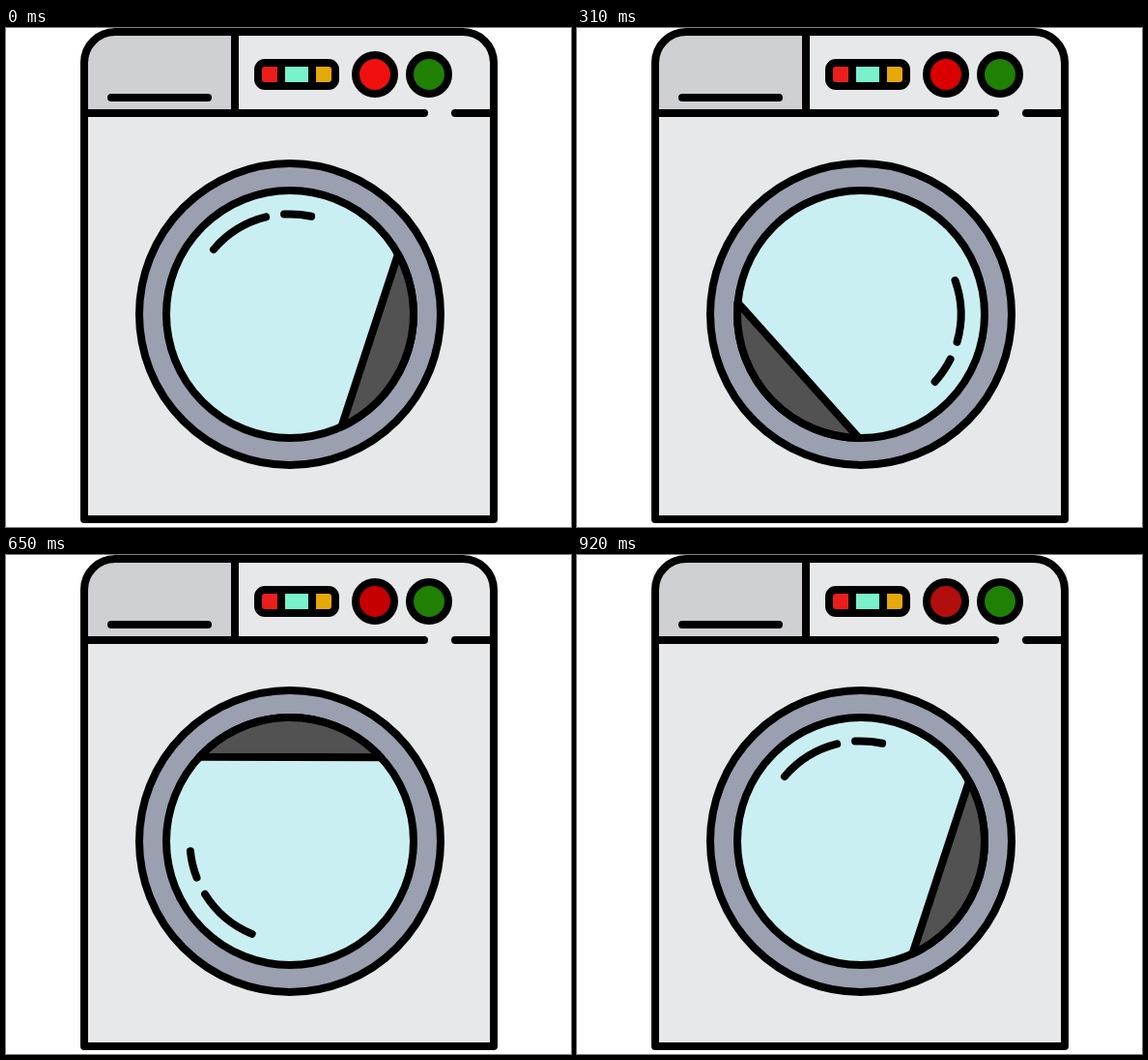
An HTML page with a canvas that plays this animation: 585x516 px, repeating every 950 ms.

```html
<!DOCTYPE html>
<html lang="en">
<head>
<meta charset="utf-8">
<title>Washing machine</title>
<style>
  html, body { margin: 0; width: 100%; height: 100%; overflow: hidden; background: #fff; }
  canvas { display: block; }
</style>
</head>
<body>
<canvas id="stage" width="585" height="516"></canvas>
<script>
const ctx = document.getElementById('stage').getContext('2d');
const TAU = Math.PI * 2;
const rad = deg => deg * Math.PI / 180;

const STEPS = 31;
const DRUM = { x: 294, y: 296, rim: 156, glass: 128 };
const LEVEL = 87;

// Two poses are held slightly longer than the others.
const holds = Array(STEPS).fill(30);
holds[9] = holds[13] = 40;
const LOOP = holds.reduce((sum, ms) => sum + ms, 0);

function stepAt(ms) {
  let rest = ms % LOOP;
  let step = 0;
  while (step < STEPS - 1 && rest >= holds[step]) rest -= holds[step++];
  return step;
}

function line(x1, y1, x2, y2) {
  ctx.beginPath();
  ctx.moveTo(x1, y1);
  ctx.lineTo(x2, y2);
  ctx.stroke();
}

function disc(x, y, r, fill) {
  ctx.beginPath();
  ctx.arc(x, y, r, 0, TAU);
  if (fill) {
    ctx.fillStyle = fill;
    ctx.fill();
  }
  ctx.stroke();
}

function box(x, y, w, h, fill) {
  ctx.fillStyle = fill;
  ctx.fillRect(x, y, w, h);
}

function drawCabinet() {
  const shell = new Path2D();
  shell.roundRect(81, 4, 424, 504, [32, 32, 0, 0]);

  ctx.save();
  ctx.clip(shell);
  box(81, 4, 424, 504, '#e6e8ea');
  box(81, 4, 156, 84, '#cfd0d4');
  ctx.restore();

  ctx.stroke(shell);
  line(237, 4, 237, 88);
  line(81, 88, 433, 88);
  line(465, 88, 505, 88);
  line(109, 72, 209, 72);
}

function drawDisplay() {
  box(261, 36, 24, 24, '#eb1f1a');
  box(285, 36, 32, 24, '#79f1cb');
  box(317, 36, 24, 24, '#e5a90a');
  line(285, 36, 285, 60);
  line(317, 36, 317, 60);
  ctx.beginPath();
  ctx.roundRect(261, 36, 80, 24, 7);
  ctx.stroke();
}

function drawKnobs(step) {
  const red = Math.round(240 - 62 * step / (STEPS - 1));
  const tint = Math.round(Math.max(0, 16 - 2.5 * step, 1.5 * (step - 21)));
  disc(382, 48, 20, `rgb(${red},${tint},${tint})`);
  disc(438, 48, 20, '#1f8003');
}

function drawDrum(step) {
  ctx.save();
  ctx.translate(DRUM.x, DRUM.y);
  disc(0, 0, DRUM.rim, '#9aa0b0');
  disc(0, 0, DRUM.glass, '#caeff2');

  ctx.rotate(rad(step * 360 / (STEPS - 1)));

  // The dark segment beyond the chord
  const half = Math.acos(LEVEL / DRUM.glass);
  const tilt = rad(18.15);
  ctx.beginPath();
  ctx.arc(0, 0, DRUM.glass, tilt - half, tilt + half);
  ctx.closePath();
  ctx.fillStyle = '#525252';
  ctx.fill();
  ctx.save();
  ctx.lineCap = 'butt';
  ctx.stroke();
  ctx.restore();

  for (const [from, to] of [[220.3, 256.1], [266.7, 282.3]]) {
    ctx.beginPath();
    ctx.arc(0, 0, 103.6, rad(from), rad(to));
    ctx.stroke();
  }
  ctx.restore();
}

function draw(ms) {
  const step = stepAt(ms);
  ctx.fillStyle = '#fff';
  ctx.fillRect(0, 0, 585, 516);
  ctx.strokeStyle = '#000';
  ctx.lineWidth = 8;
  ctx.lineCap = ctx.lineJoin = 'round';
  drawCabinet();
  drawDisplay();
  drawKnobs(step);
  drawDrum(step);
}

const start = performance.now();
function tick() {
  draw(performance.now() - start);
  requestAnimationFrame(tick);
}
tick();
</script>
</body>
</html>
```
